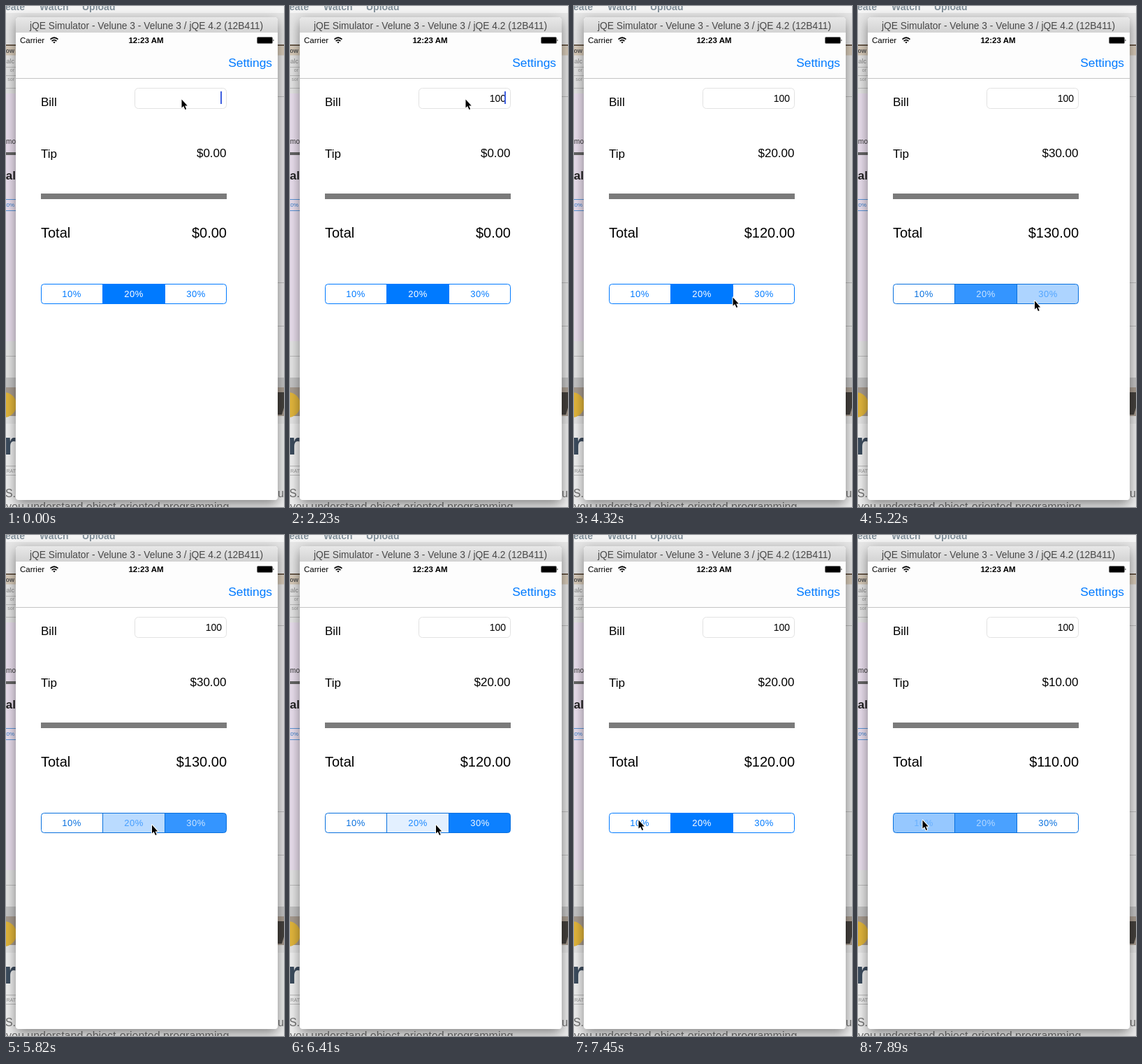
Animation, 398 px wide and 716 px high, one loop 8 s. Source, as an HTML page:

```html
<!DOCTYPE html>
<html lang="en">
<head>
<meta charset="utf-8">
<title>Tip calculator</title>
<style>
  html, body { margin: 0; width: 100%; height: 100%; overflow: hidden; background: #e4e4e4; }
  svg { display: block; width: 398px; height: 716px; }
  text { font-family: "Liberation Sans", Arial, sans-serif; }
  .end { text-anchor: end; }
  .mid { text-anchor: middle; }
  #window { filter: drop-shadow(0 6px 9px rgba(0, 0, 0, .46)); }
  #segments text { font-size: 13px; letter-spacing: .5px; text-anchor: middle; }
</style>
</head>
<body>
<svg viewBox="0 0 398 716">
  <defs>
    <linearGradient id="titlebar" x2="0" y2="1">
      <stop stop-color="#e8e8e8"/><stop offset="1" stop-color="#d3d3d3"/>
    </linearGradient>
    <clipPath id="pill"><rect x="50.5" y="397.5" width="265" height="28" rx="4"/></clipPath>
  </defs>

  <!-- desktop behind the window -->
  <rect width="398" height="716" fill="#e6e6e6"/>
  <rect width="398" height="10" fill="#f5f5f5"/>
  <g font-size="14" font-weight="700" fill="#82909a">
    <text x="27" y="6" class="end">eate</text>
    <text x="48" y="6">Watch</text>
    <text x="109" y="6">Upload</text>
  </g>
  <path d="M0 56H14M389 56H398" stroke="#6b5b4a" stroke-width="2"/>
  <path d="M0 64H14M389 64H398" stroke="#d8cbb9" stroke-width="13"/>
  <g fill="#555" font-size="9">
    <text x="12" y="67" class="end" font-weight="700">ow</text>
    <text x="12" y="82" class="end" fill="#888">calc</text>
    <text x="12" y="94" class="end" fill="#999" font-size="7">or</text>
    <text x="12" y="107" class="end" fill="#999" font-size="7">sor</text>
  </g>
  <path d="M0 87.500H14M0 99.500H14M0 117.500H14" stroke="#bbb"/>
  <rect y="125" width="14" height="354" fill="#eadfee"/>
  <text x="14" y="197" class="end" font-size="10" fill="#333">mo</text>
  <rect y="209" width="14" height="4" fill="#666"/>
  <text x="14" y="248" class="end" font-size="17" font-weight="700" fill="#222">tal</text>
  <path d="M0 276.500H14M0 292.500H14" stroke="#5a95d8"/>
  <text x="12" y="287" class="end" font-size="8" fill="#3b80cf">0%</text>
  <path d="M389 129.500H398M389 395.500H398M389 457.500H398M0 500.500H14" stroke="#bcbcbc"/>
  <rect y="531" width="398" height="14" fill="#c4c4c4"/>
  <rect y="545" width="398" height="41" fill="#a89c90"/>
  <circle cx="-3" cy="570" r="18" fill="#e2b63c"/>
  <path d="M389 552H398V574L395 584H389Z" fill="#45413d"/>
  <rect y="597" width="398" height="119" fill="#f0f0f0"/>
  <text x="14" y="641" class="end" font-size="44" font-weight="700" fill="#3c4c5e">r</text>
  <rect x="-4" y="657.500" width="22" height="13" fill="none" stroke="#bbb"/>
  <text x="14" y="667" class="end" font-size="7" fill="#999">RAT</text>
  <g font-size="16" fill="#707070">
    <text x="14" y="702" class="end">S.</text>
    <text x="389" y="702">u</text>
    <text x="0" y="721">you understand object-oriented programming</text>
  </g>

  <!-- simulator window -->
  <g id="window">
    <path d="M14 38V21Q14 16 19 16H384Q389 16 389 21V702Q389 706 385 706H18Q14 706 14 702Z" fill="#fff"/>
  </g>
  <path d="M14 38V21Q14 16 19 16H384Q389 16 389 21V38Z" fill="url(#titlebar)"/>
  <text x="201" y="33" class="mid" font-size="13.800" fill="#484848">jQE Simulator - Velune 3 - Velune 3 / jQE 4.2 (12B411)</text>
  <rect x="14" y="38" width="375" height="65" fill="#fdfdfd"/>
  <path d="M14 103.500H389" stroke="#c4c4c4"/>

  <text x="20" y="53" font-size="11.500">Carrier</text>
  <g fill="none" stroke="#000" stroke-width="1.700">
    <path d="M63.500 47.700Q69 42.800 74.500 47.700M65.600 50.100Q69 47 72.400 50.100"/>
    <path d="M69 53.500L67.300 51.600Q69 50.300 70.700 51.600Z" fill="#000" stroke="none"/>
  </g>
  <text x="200.500" y="53" class="mid" font-size="11.500" font-weight="700">12:23 AM</text>
  <rect x="359.500" y="44.500" width="22" height="9" rx="1.500" stroke="#777"/>
  <path d="M382.500 47.500Q384.500 49 382.500 50.500Z"/>
  <text x="381" y="87" class="end" font-size="17.400" fill="#007aff">Settings</text>

  <!-- calculator -->
  <g font-size="17">
    <text x="50" y="143">Bill</text>
    <text x="50" y="217">Tip</text>
    <text id="tip" x="315.500" y="216" class="end"></text>
  </g>
  <g font-size="20">
    <text x="50" y="331">Total</text>
    <text id="total" x="316" y="331" class="end"></text>
  </g>
  <rect x="184.500" y="117.500" width="131" height="29" rx="5" fill="#fff" stroke="#e2e2e2"/>
  <text id="bill" x="309" y="137" class="end" font-size="14"></text>
  <rect id="caret" x="307" y="122" width="2" height="18" fill="#3f5fe0"/>
  <rect x="50" y="268" width="266" height="8" fill="#7a7a7a"/>

  <g id="segments">
    <g clip-path="url(#pill)">
      <rect x="50" y="397" width="88.500" height="29"/>
      <rect x="138.500" y="397" width="89" height="29"/>
      <rect x="227.500" y="397" width="89" height="29"/>
    </g>
    <path id="outline" fill="none" d="M54.500 397.500H311.500Q315.500 397.500 315.500 401.500V421.500Q315.500 425.500 311.500 425.500H54.500Q50.500 425.500 50.500 421.500V401.500Q50.500 397.500 54.500 397.500ZM138.500 397.500V425.500M227.500 397.500V425.500"/>
    <text x="94" y="416">10%</text>
    <text x="183" y="416">20%</text>
    <text x="272" y="416">30%</text>
  </g>

  <path id="pointer" d="M1 1.500V13.500L3.700 11L5.900 16L7.700 15.200L5.600 10.400H9.200Z" stroke="#fff" stroke-width="2" stroke-linejoin="round" paint-order="stroke"/>
</svg>

<script>
const LOOP = 8000, TICK = 148.5;
const TYPING = [1500, 1790, 2220], DISMISSED = 2960;

// time, x, y of the pointer tip
const POINTER = [
  [0, 250.500, 132], [2230, 250.500, 132], [2820, 341, 203], [3600, 341, 203],
  [4300, 226, 415], [4600, 252, 420], [5220, 252, 420], [5700, 208, 413],
  [6560, 208, 413], [6980, 118, 408], [7400, 91.500, 406], [LOOP, 91.500, 406]
];

const TAPS = [
  { start: 4795, span: 1250, from: 1, to: 2 },
  { start: 6270, span: 1040, from: 2, to: 1 },
  { start: 7445, span: 1030, from: 1, to: 0 }
];

const $ = id => document.getElementById(id);
const cells = [...document.querySelectorAll('#segments rect')];
const labels = [...document.querySelectorAll('#segments text')];
const money = value => '$' + value.toFixed(2);
const mix = (a, b, p) => a + (b - a) * p;
const blend = (a, b, p) => `rgb(${a.map((v, i) => Math.round(mix(v, b[i], p)))})`;
const WHITE = [255, 255, 255], BLUE = [0, 122, 255], DIM_BLUE = [8, 112, 222];

function pointerAt(t) {
  const i = POINTER.findIndex(key => key[0] > t);
  const [t0, x0, y0] = POINTER[i - 1], [t1, x1, y1] = POINTER[i];
  const p = (t - t0) / (t1 - t0);
  return [mix(x0, x1, p), mix(y0, y1, p)];
}

function drawSegments(tap, t) {
  const fill = [0, 0, 0];
  const p = tap ? Math.min(1, (t - tap.start) / tap.span) : 1;
  if (tap) {
    fill[tap.from] = 1 - p ** 1.4;
    fill[tap.to] = p;
  } else {
    fill[1] = 1;
  }
  const ink = p < 1 ? DIM_BLUE : BLUE;
  $('outline').setAttribute('stroke', `rgb(${ink})`);
  fill.forEach((amount, i) => {
    cells[i].setAttribute('fill', blend(WHITE, BLUE, amount));
    labels[i].setAttribute('fill', blend(amount ? BLUE : ink, WHITE, amount));
  });
}

function caretOpacity(t) {
  if (t >= DISMISSED) return 0;
  if (t < 880 || t >= 1480) return 1;
  return t < 1180 ? .6 : t < 1330 ? 0 : .4;
}

function draw(now) {
  const t = Math.floor((now % LOOP) / TICK) * TICK;
  const tap = TAPS.filter(item => item.start <= t).pop();
  const rate = tap ? [.1, .2, .3][tap.to] : .2;
  const amount = t >= DISMISSED ? 100 : 0;

  $('bill').textContent = '100'.slice(0, TYPING.filter(time => time <= t).length);
  $('tip').textContent = money(amount * rate);
  $('total').textContent = money(amount * (1 + rate));
  $('caret').setAttribute('opacity', caretOpacity(t));
  $('pointer').setAttribute('transform', `translate(${pointerAt(t)})`);
  drawSegments(tap, t);
}

const began = performance.now();
function frame() {
  draw(performance.now() - began);
  requestAnimationFrame(frame);
}
frame();
</script>
</body>
</html>
```
